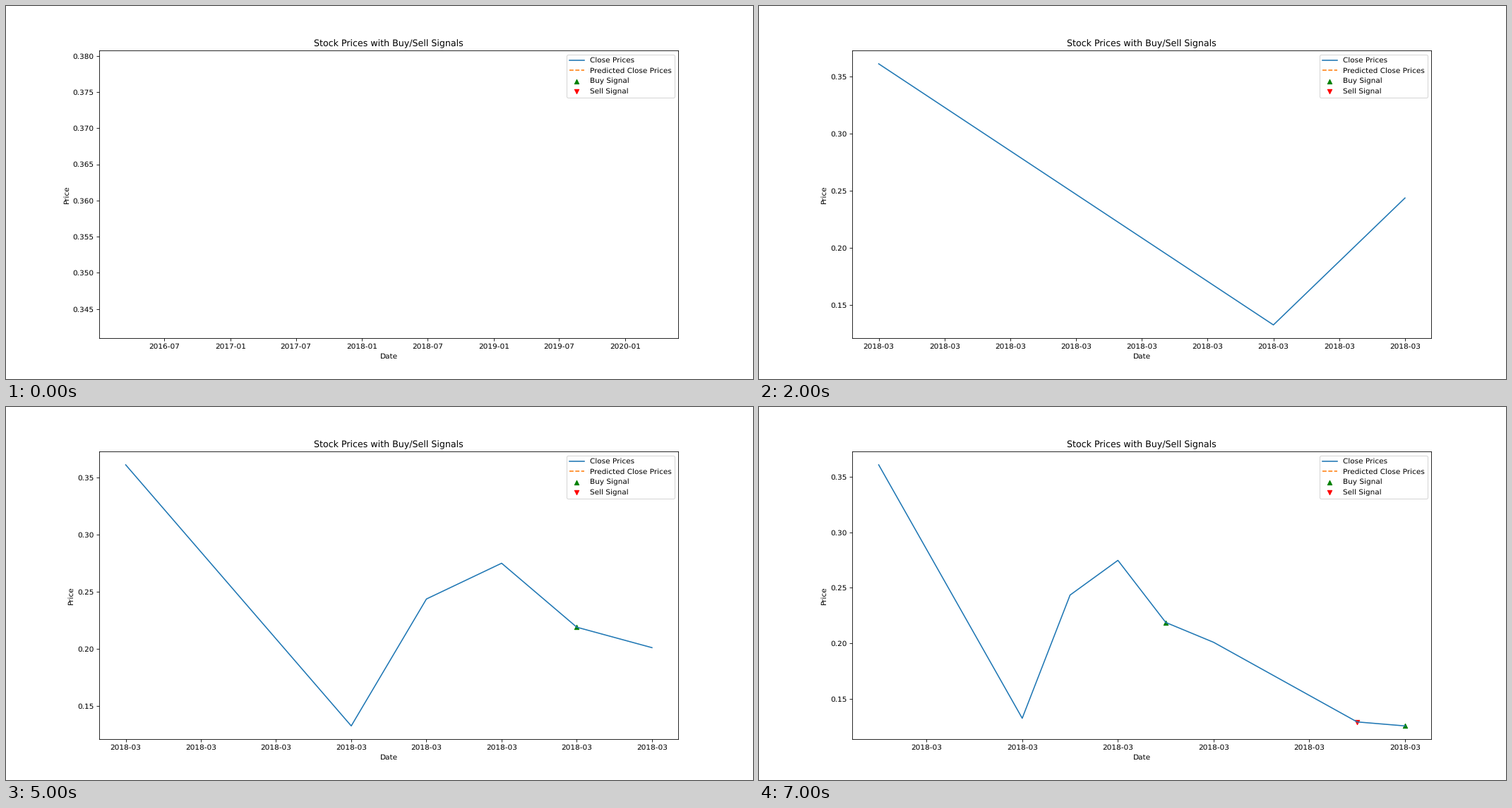
Recreate the animation shown at these times as a matplotlib script. Size 1058 by 529 pixels, loop 8000 ms.

```python
import numpy as np
import matplotlib.pyplot as plt
from matplotlib.animation import FuncAnimation
from matplotlib.dates import DateFormatter

DAYS = np.array([0, 3, 4, 5, 6, 7, 10, 11])
DATES = np.datetime64("2018-03-16") + DAYS
PRICES = np.array([0.36085, 0.1323, 0.2434, 0.2747, 0.2187, 0.2008, 0.1290, 0.1254])
BUY = [4, 7]
SELL = [6]

# Unhinted glyphs keep the text widths proportional at this low dpi.
plt.rcParams.update({"font.family": "DejaVu Sans", "text.hinting": "none"})
fig, ax = plt.subplots(figsize=(14, 7), dpi=1058 / 14)


def draw_signals(indices, count, **style):
    shown = np.isin(np.arange(count), indices)
    ax.scatter(DATES[:count][shown], PRICES[:count][shown], **style)


def draw(frame):
    """Show the prices up to this day and let the axes rescale to them."""
    count = frame + 1
    ax.clear()
    ax.plot(DATES[:count], PRICES[:count], color="#1f77b4", label="Close Prices")
    ax.plot(DATES[:0], PRICES[:0], "--", color="#ff7f0e", label="Predicted Close Prices")
    draw_signals(BUY, count, marker="^", color="green", label="Buy Signal")
    draw_signals(SELL, count, marker="v", color="red", label="Sell Signal")
    ax.xaxis.set_major_formatter(DateFormatter("%Y-%m"))
    ax.set_title("Stock Prices with Buy/Sell Signals")
    ax.set_xlabel("Date")
    ax.set_ylabel("Price")
    ax.legend(loc="upper right", labelspacing=0.46, borderpad=0.38)


anim = FuncAnimation(fig, draw, frames=len(DAYS), interval=1000, repeat=True, repeat_delay=0)
plt.show()
```
